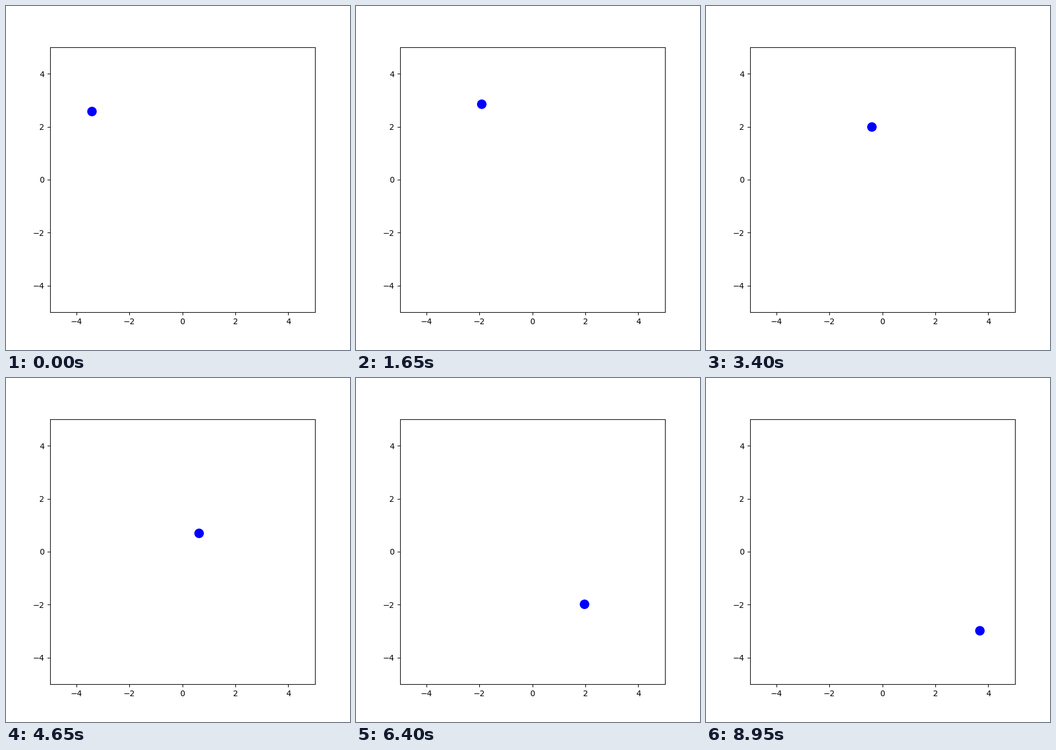
A matplotlib script for the animation above (9 s loop, 600 by 600 pixels).

```python
import math

import matplotlib.pyplot as plt
from matplotlib.animation import FuncAnimation
from matplotlib.patches import Circle

FRAMES = 180
INTERVAL = 50
DT = 0.01
GRAVITY = 9.8
DRAG = 0.0312
BOUNCE = 0.875
RADIUS = 0.18
LIMIT = 5
FLOOR = -LIMIT + RADIUS


def accel(vx, vy):
    """Gravity plus quadratic air drag."""
    drag = DRAG * math.hypot(vx, vy)
    return -drag * vx, -GRAVITY - drag * vy


def trajectory(x, y, vx, vy):
    path = []
    for _ in range(FRAMES):
        path.append((x, y))
        ax_, ay = accel(vx, vy)
        mx, my = vx + ax_ * DT / 2, vy + ay * DT / 2
        ax_, ay = accel(mx, my)
        x, y = x + mx * DT, y + my * DT
        vx, vy = vx + ax_ * DT, vy + ay * DT
        if y < FLOOR and vy < 0:
            y = FLOOR + BOUNCE * (FLOOR - y)
            vy = -BOUNCE * vy
    return path


path = trajectory(-3.41, 2.575, 4.667, 2.485)

fig, ax = plt.subplots(figsize=(6, 6), dpi=100)
ax.set_xlim(-LIMIT, LIMIT)
ax.set_ylim(-LIMIT, LIMIT)
ax.set_aspect("equal")
ax.set_xticks(range(-4, 5, 2))
ax.set_yticks(range(-4, 5, 2))

ball = ax.add_patch(Circle(path[0], RADIUS, facecolor="blue", linewidth=0))


def update(i):
    ball.center = path[i]
    return (ball,)


anim = FuncAnimation(fig, update, frames=FRAMES, interval=INTERVAL,
                     repeat=True, repeat_delay=0)
plt.show()
```
